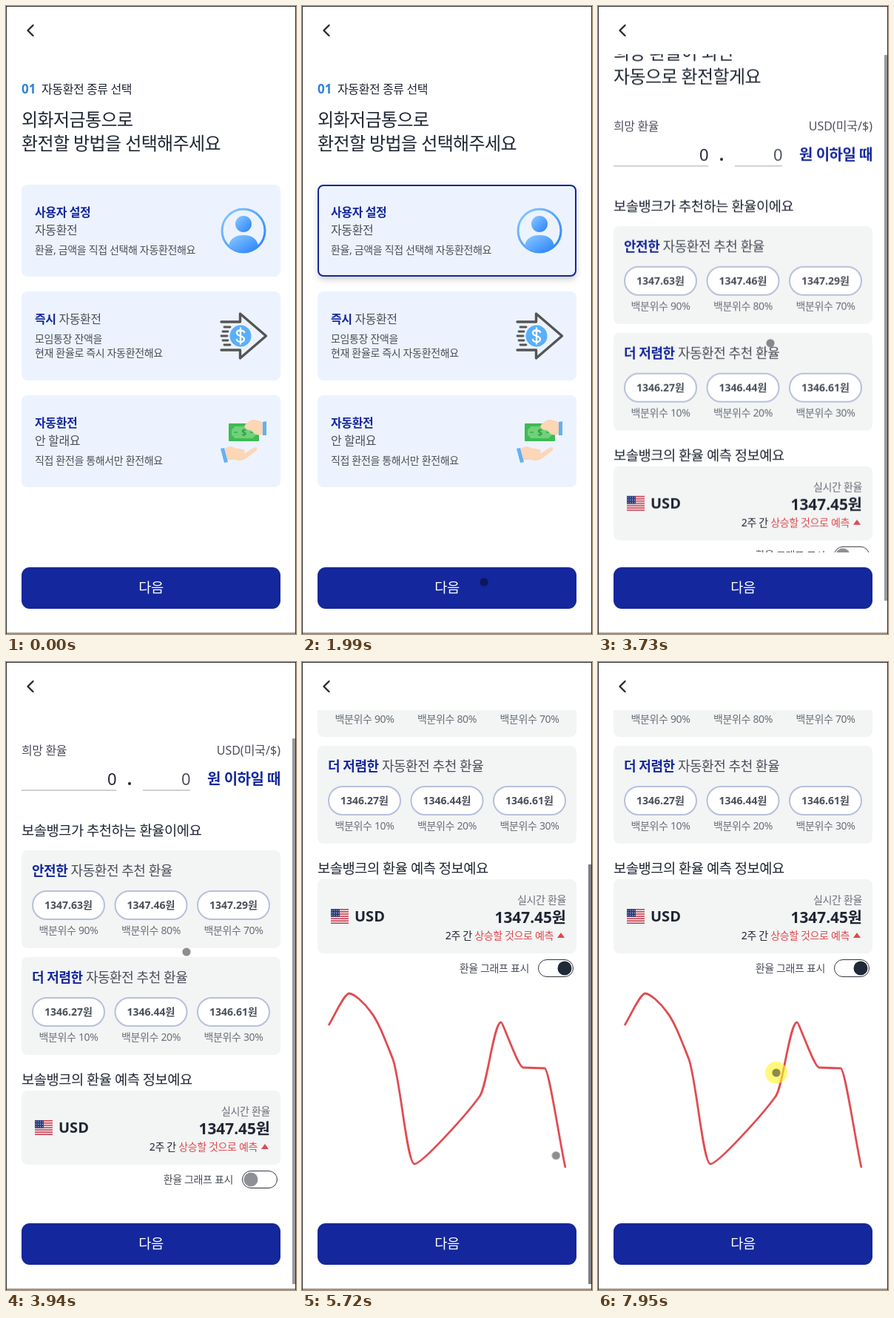
These frames come from a looping animation (392 px wide and 847 px high, 8 s). An HTML page:

```html
<!DOCTYPE html>
<html lang="ko">
<head>
<meta charset="utf-8">
<title>자동환전 설정</title>
<style>
html, body { margin: 0; width: 100%; height: 100%; overflow: hidden; background: #fff; }
svg { display: block; width: 392px; height: 847px; }
text { font: 400 14px 'Noto Sans', 'Noto Sans CJK KR', sans-serif; letter-spacing: -.025em; fill: #4b4f5a; }
.navy { fill: #14279c; }
.dark { fill: #1f2533; }
.grey { fill: #6b6f78; }
.red { fill: #e0474c; }
.white { fill: #fff; }
.b { font-weight: 600; }
.m { font-weight: 500; }
.num { letter-spacing: 0; }
.s16 { font-size: 16px; }
.s18 { font-size: 18px; }
.h3 { font-size: 18.72px; }
.s20 { font-size: 20px; }
.s21 { font-size: 20.8px; }
.s22 { font-size: 22px; }
.h2 { font-size: 24px; }
.end { text-anchor: end; }
.mid { text-anchor: middle; }

.anim { animation: 8s linear infinite; }
.hard { animation-timing-function: step-end; }

#page1 { animation-name: leave; }
#page2 { animation-name: enter; }
#pick { animation-name: pick; }
#caret { animation-name: caret; }
#body { animation-name: scroll; }
#graph { animation-name: graph; }
#knob { animation-name: knob; }
#bar { animation-name: bar; }
#thumb { animation-name: thumb; }
#cursor { animation-name: move; }
#press { animation-name: press; }

@keyframes leave { 0% { opacity: 1 } 27.5%, 100% { opacity: 0 } }
@keyframes enter { 0% { opacity: 0 } 27.5%, 100% { opacity: 1 } }
@keyframes pick { 0% { opacity: 0 } 15.5%, 100% { opacity: 1 } }
@keyframes caret { 0% { opacity: 0 } 33.6% { opacity: 1 } 39%, 100% { opacity: 0 } }
@keyframes graph { 0% { opacity: 0 } 62.5%, 100% { opacity: 1 } }
@keyframes scroll {
  0%, 44.5% { transform: none; animation-timing-function: ease-out }
  49.2% { transform: translateY(-117px) }
  50.2%, 65% { transform: translateY(-118px); animation-timing-function: ease-out }
  69%, 100% { transform: translateY(-402px) }
}
@keyframes knob {
  0%, 61.4% { transform: none; fill: #8f8f97 }
  63.4%, 100% { transform: translateX(24px); fill: #1f2937 }
}
@keyframes bar {
  0%, 44.4% { opacity: 0 }
  44.9%, 55.4% { opacity: .8 }
  59%, 64.6% { opacity: 0 }
  65.5%, 76% { opacity: 1 }
  80%, 100% { opacity: 0 }
}
@keyframes thumb {
  0%, 44.5% { transform: translateY(2px); height: 736px; animation-timing-function: ease-out }
  49.2% { transform: translateY(103px); height: 736px }
  50.2%, 62.5% { transform: translateY(104px); height: 736px }
  62.6%, 65% { transform: translateY(80px); height: 566px; animation-timing-function: ease-out }
  69%, 100% { transform: translateY(273px); height: 566px }
}
@keyframes move {
  0%, 4% { transform: translate(400px, 226px) }
  5% { transform: translate(378px, 230px) }
  8% { transform: translate(262px, 272px) }
  10.4%, 13.6% { transform: translate(216px, 286px) }
  14.6%, 16.3% { transform: translate(245px, 276px) }
  18.5% { transform: translate(276px, 430px) }
  21.2% { transform: translate(280px, 680px) }
  23.1% { transform: translate(250px, 770px) }
  24.9% { transform: translate(246px, 777px) }
  25.8%, 27.9% { transform: translate(239px, 788px) }
  31% { transform: translate(206px, 610px) }
  34.5% { transform: translate(165px, 440px) }
  36.5% { transform: translate(158px, 434px) }
  44% { transform: translate(222px, 519px) }
  49.25%, 55% { transform: translate(244px, 391px) }
  59.5%, 64% { transform: translate(360px, 703px) }
  69%, 71.5% { transform: translate(344px, 666px) }
  77% { transform: translate(48px, 492px) }
  81.5%, 83.5% { transform: translate(112px, 597px) }
  86.5% { transform: translate(152px, 677px) }
  91% { transform: translate(246px, 530px) }
  92.4% { transform: translate(262px, 566px) }
  95.8% { transform: translate(358px, 672px) }
  98.8%, 100% { transform: translate(241px, 554px) }
}
@keyframes press {
  0% { opacity: 0 }
  14.6% { opacity: 1 } 16.3% { opacity: 0 }
  25.8% { opacity: 1 } 27.5% { opacity: 0 }
  60% { opacity: 1 } 62% { opacity: 0 }
  81.8% { opacity: 1 } 83.5% { opacity: 0 }
  99% { opacity: 1 }
}
</style>
</head>
<body>
<svg viewBox="0 0 392 847">
  <defs>
    <linearGradient id="sky" x1="0" y1="0" x2="1" y2="1">
      <stop offset="0" stop-color="#8ccbff"/><stop offset="1" stop-color="#2680fb"/>
    </linearGradient>
    <clipPath id="view"><rect y="65" width="392" height="672"/></clipPath>
    <clipPath id="face"><circle cx="321" cy="303" r="29"/></clipPath>
    <filter id="soft" x="-10%" y="-20%" width="120%" height="150%">
      <feDropShadow dx="0" dy="4" stdDeviation="4" flood-opacity=".18"/>
    </filter>
  </defs>
  <rect width="392" height="847" fill="#fff"/>

  <g id="page1" class="anim hard">
    <text x="21" y="118" class="b num" style="font-size:17px;fill:#3182d6">01</text>
    <text x="48" y="118" class="s16 m dark">자동환전 종류 선택</text>
    <text x="21" y="162" class="h2 m dark">외화저금통으로</text>
    <text x="21" y="194" class="h2 m dark">환전할 방법을 선택해주세요</text>

    <g fill="#ecf3fe">
      <rect x="21" y="241" width="350" height="124" rx="8"/>
      <rect x="21" y="385" width="350" height="120" rx="8"/>
      <rect x="21" y="525" width="350" height="124" rx="8"/>
    </g>
    <rect id="pick" class="anim hard" x="22" y="242" width="348" height="122" rx="7" fill="#ecf3fe" stroke="#14279c" stroke-width="2" filter="url(#soft)"/>

    <text x="39" y="284" class="s16 b navy">사용자 설정</text>
    <text x="39" y="308" class="s16 m">자동환전</text>
    <text x="39" y="334">환율, 금액을 직접 선택해 자동환전해요</text>
    <text x="39" y="428" class="s16 m"><tspan class="b navy">즉시</tspan> 자동환전</text>
    <text x="39" y="454">모임통장 잔액을</text>
    <text x="39" y="473">현재 환율로 즉시 자동환전해요</text>
    <text x="39" y="568" class="s16 b navy">자동환전</text>
    <text x="39" y="592" class="s16 m">안 할래요</text>
    <text x="39" y="618">직접 환전을 통해서만 환전해요</text>

    <g fill="url(#sky)">
      <circle cx="321" cy="303" r="29" fill="none" stroke="url(#sky)" stroke-width="3"/>
      <circle cx="321" cy="294" r="11"/>
      <path d="M301 333V326C301 315 309 309 321 309S341 315 341 326V333Z" clip-path="url(#face)"/>
    </g>

    <g fill="none" stroke="#555" stroke-width="3.4" stroke-linejoin="round" stroke-linecap="round">
      <path d="M291 426H316.500V415L351.500 445L316.500 475V464H291"/>
      <path d="M295 433H303M293 439H300M291 445H299M293 451H300M295 457H303" stroke-width="2.800"/>
    </g>
    <circle cx="317" cy="445" r="14.5" fill="#5aaffa"/>
    <path d="M322 440C321 437 312 436 312 441C312 446 322 444 322 449.500C322 454 313 454 312 450M317 434.500V455.500" fill="none" stroke="#fff" stroke-width="2.300" stroke-linecap="round"/>

    <rect x="301" y="563" width="41" height="24" rx="1" fill="#3dbb55"/>
    <path d="M309 567H334Q335 570 338 571V579Q335 580 334 583H309Q308 580 305 579V571Q308 570 309 567Z" fill="#72d07a"/>
    <path d="M308 575H313M330 575H335" stroke="#3dbb55" stroke-width="2"/>
    <text x="321.500" y="579.500" class="mid b" style="font-size:12px;fill:#2c9f45">$</text>
    <path d="M322 567Q326 560 334 558Q341 558 348 562V577Q342 580 336 577L331 572Q325 573 322 567Z" fill="#fcd6b5"/>
    <path d="M347 561L352 560V579H347Z" fill="#63b0f3"/>
    <path d="M296 597Q303 592 309 596L321 598Q325 600 321 602L324 603Q331 597 338 595Q341 597 338 600L325 610Q318 615 310 612L299 612Z" fill="#fcd6b5"/>
    <path d="M290 597L295 596L300 615L295 616Z" fill="#63b0f3"/>
  </g>

  <g id="page2" class="anim hard">
    <g clip-path="url(#view)">
      <g id="body" class="anim">
        <path id="caret" class="anim hard" d="M21.500 86V107" stroke="#222"/>
        <text x="21" y="102" class="b num" style="font-size:17px;fill:#3a60b0">02</text>
        <text x="48" y="102" class="s16 m dark">희망 환율 설정</text>
        <text x="21" y="146" class="h2 m dark">희망 환율이 되면</text>
        <text x="21" y="178" class="h2 m dark">자동으로 환전할게요</text>

        <text x="21" y="242" class="s16">희망 환율</text>
        <text x="371" y="242" class="s16 num end">USD(미국/$)</text>
        <text x="149.500" y="282.500" class="s22 num end dark">0</text>
        <circle cx="167" cy="281" r="2" fill="#222"/>
        <text x="249.500" y="282.500" class="s22 num end">0</text>
        <path d="M21 290H149M185 290H249" stroke="#d0d0d3" stroke-width="2"/>
        <text x="371" y="282" class="s20 b navy end">원 이하일 때</text>

        <text x="21" y="351" class="h3 m dark">보솔뱅크가 추천하는 환율이에요</text>
        <g id="rates"></g>

        <text x="21" y="687" class="h3 m dark">보솔뱅크의 환율 예측 정보예요</text>
        <rect x="21" y="695" width="350" height="100" rx="8" fill="#f3f4f4"/>
        <g id="flag"></g>
        <text x="71" y="752" class="s20 b num dark">USD</text>
        <text x="357" y="728" class="end grey">실시간 환율</text>
        <text x="357" y="753.500" class="s21 b num end dark">1347.45원</text>
        <text x="340" y="776" class="end dark">2주 간 <tspan class="red">상승할 것으로 예측</tspan></text>
        <path d="M345 774L350 767L355 774Z" class="red"/>

        <text x="307" y="820" class="end">환율 그래프 표시</text>
        <rect x="319.500" y="803.500" width="47" height="23" rx="11.500" fill="#fff" stroke="#30343c"/>
        <circle id="knob" class="anim" cx="331" cy="815" r="9.500"/>

        <path id="graph" class="anim hard" transform="translate(0 402)" fill="none" stroke="#e04d52" stroke-width="2.800" stroke-linejoin="round" d="M36 490C45 475 57 447 64 447C71 448 84 459 93 472C103 484 113 511 123 536C133 565 142 677 152 677C162 677 222 611 240 586C250 574 259 486 269 486C272 486 292 547 299 547L328 548C334 549 347 640 356 682"/>
      </g>
    </g>
    <g id="bar" class="anim">
      <rect id="thumb" class="anim" x="387" width="4" height="736" fill="#808086"/>
    </g>
  </g>

  <path d="M36.500 26L29.500 33L36.500 40" fill="none" stroke="#24272d" stroke-width="2.300" stroke-linecap="round" stroke-linejoin="round"/>
  <rect x="21" y="757" width="350" height="56" rx="11" fill="#14279c"/>
  <text x="196" y="791" class="h3 m white mid">다음</text>

  <g id="cursor" class="anim">
    <circle id="press" class="anim hard" r="15" fill="#fff62a" fill-opacity=".62"/>
    <circle r="5.600" fill="#04040c" fill-opacity=".45"/>
  </g>
  <path d="M.5 0V847M391.500 0V847M0 .5H392M0 846H392" stroke="#303030" fill="none"/>
</svg>
<script>
const $ = id => document.getElementById(id);
const rect = (x, y, w, h, attrs) => `<rect x="${x}" y="${y}" width="${w}" height="${h}" ${attrs}/>`;

// One recommendation box: a title and three rate pills.
function rateBox(y, lead, rates, ranks) {
  const pills = rates.map((rate, i) => {
    const x = 36 + i * 111.5, mid = x + 48.5;
    return rect(x, y + 55, 97, 38, 'rx="19" fill="#fff" stroke="#b7c0dc" stroke-width="2"') +
      `<text x="${mid}" y="${y + 79}" class="b num mid">${rate}원</text>
       <text x="${mid}" y="${y + 113}" class="mid grey">백분위수 ${ranks[i]}%</text>`;
  });
  return rect(21, y, 350, 132, 'rx="8" fill="#f3f4f4"') +
    `<text x="35" y="${y + 34}" class="s18 m"><tspan class="b navy">${lead}</tspan> 자동환전 추천 환율</text>` +
    pills.join('');
}

$('rates').innerHTML =
  rateBox(371, '안전한', ['1347.63', '1347.46', '1347.29'], [90, 80, 70]) +
  rateBox(515, '더 저렴한', ['1346.27', '1346.44', '1346.61'], [10, 20, 30]);

let flag = rect(39, 735, 24, 20, 'fill="#f6f1f3"');
for (let i = 0; i < 7; i++) flag += rect(39, 735 + i * 3.08, 24, 1.54, 'fill="#c4384a"');
flag += rect(39, 735, 12, 10.8, 'fill="#2f3f7c"');
for (let i = 0; i < 12; i++)
  flag += `<circle cx="${40.5 + i % 4 * 3}" cy="${737 + (i >> 2) * 3.4}" r=".6" fill="#dfe3f0"/>`;
$('flag').innerHTML = flag;
</script>
</body>
</html>
```
